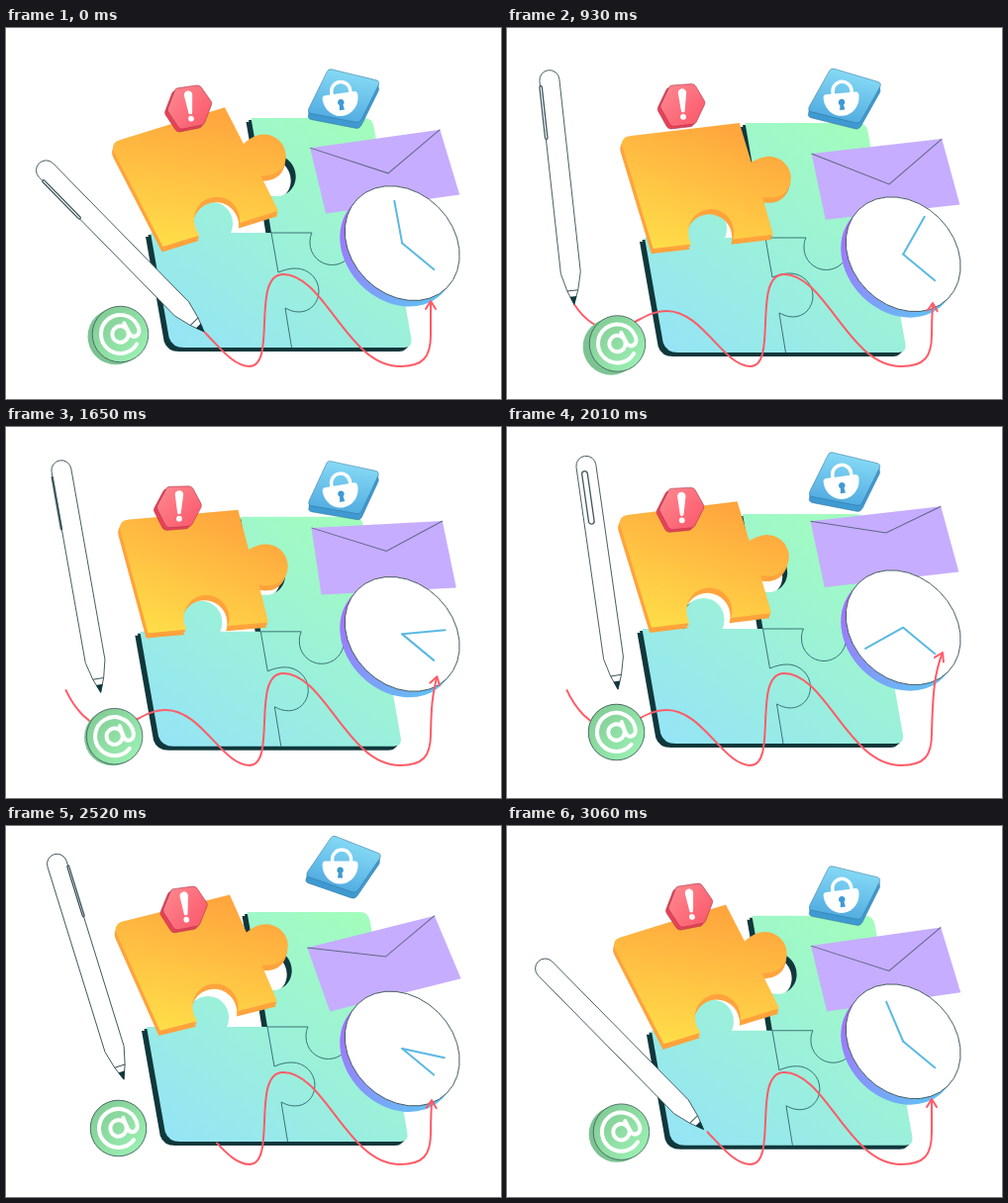
Recreate the animation shown at these times as an HTML page. Size 500x375 px, loop 3090 ms.

```html
<!DOCTYPE html>
<html lang="en">
<head>
<meta charset="utf-8">
<title>Puzzle desk</title>
<style>
  html, body { margin: 0; width: 100%; height: 100%; overflow: hidden; background: #fff; }
  svg { display: block; width: 100vw; height: 100vh; }
  .line { fill: none; stroke: #3d7377; stroke-width: 1; }
  .edge { stroke: #3f565c; stroke-width: .9; stroke-linejoin: round; }
  .red { fill: none; stroke: #ff5c68; stroke-width: 2; stroke-linejoin: round; stroke-linecap: round; }
  #trail { stroke-linecap: butt; }
  .hand { fill: none; stroke: #5bb9e3; stroke-width: 2; stroke-linecap: round; }
  #sign { fill: none; stroke: #fff; stroke-width: 4; stroke-linecap: round; stroke-linejoin: round; }
</style>
</head>
<body>
<svg viewBox="0 0 500 375">
  <defs>
    <linearGradient id="mint" x1="0" y1="1" x2=".8" y2="0">
      <stop offset="0" stop-color="#94e3f9"/><stop offset="1" stop-color="#a2fdbc"/>
    </linearGradient>
    <linearGradient id="amber" x1=".1" y1="1" x2=".75" y2=".1">
      <stop offset="0" stop-color="#ffdf49"/><stop offset="1" stop-color="#ffa63d"/>
    </linearGradient>
    <linearGradient id="rose" x1="0" y1="0" x2="1" y2="1">
      <stop offset="0" stop-color="#ff8b92"/><stop offset="1" stop-color="#fb5468"/>
    </linearGradient>
    <linearGradient id="sky" x1=".6" y1="0" x2=".4" y2="1">
      <stop offset="0" stop-color="#88dcf6"/><stop offset="1" stop-color="#50aae0"/>
    </linearGradient>
    <linearGradient id="rim">
      <stop offset="0" stop-color="#a66fff"/><stop offset="1" stop-color="#62c0f4"/>
    </linearGradient>
    <linearGradient id="leaf" x1="0" y1="0" x2="1" y2="1">
      <stop offset="0" stop-color="#7fc792"/><stop offset="1" stop-color="#9ff5b6"/>
    </linearGradient>

    <path id="base" d="M-20.5-116H94Q102-116 103.6-107L141.4 107Q143 116 134 116H-88Q-100 116-103.3 106L-122 0H-79
      c-1.5-3-2-6-2-10a21 21 0 0 1 42 0c0 4-.5 7-2 10H0L-6.3-39
      c4 1 7 2 12 2c10 0 19-8 19-20c0-12-10-22-22-22c-5 0-9 1-16 4Z"/>
    <path id="piece" d="M-131-116H-20.5L-13.3-75c7-3 11-4 16-4c12 0 22 10 22 22c0 12-9 20-19 20c-5 0-8-1-12-2L0 0H-41
      c1.5-3 2-6 2-10a23 23 0 0 0-46 0c0 4 .5 7 2 10H-122L-140.5-105Q-142.5-116-131-116Z"/>
    <path id="hex" d="M-10-20L10-20.5Q13-20 14-18L22-3Q23-1 22 1L13 18Q12 20 10 20L-10 21.5Q-13 21-14 19L-22 3Q-23 1-22-1L-13-18Q-12-20-10-20Z"/>
    <path id="tile" d="M-12-28L33-18Q37-17 35.500-13L19 22Q17 26 13 25L-32 17Q-36 16-34.500 12L-17-25Q-15.500-29-12-28Z"/>
    <ellipse id="disc" rx="63.7" ry="51.6" transform="rotate(45)"/>
  </defs>

  <g id="board">
    <g fill="#10383c">
      <use href="#base" transform="translate(-5 4)"/>
      <use href="#base" transform="translate(-2.5 2)"/>
    </g>
    <use href="#base" fill="url(#mint)"/>
    <path class="line" d="M0 0H41c-1.5 3-2 6-2 10a22.500 22.500 0 0 0 45 0c0-4-.5-7-2-10H122
      M0 0L7 40c7-3 12-4 18-4c12 0 23 10 23 23c0 12-9 21-20 21c-6 0-10-2-14-4L20.5 116"/>
  </g>

  <g id="orange">
    <g fill="#ffa33c" transform="translate(71 58)">
      <use href="#piece" transform="translate(-2.5 5)"/>
      <use href="#piece" transform="translate(-1.2 2.5)"/>
      <use href="#piece" fill="url(#amber)"/>
    </g>
  </g>

  <g id="alert">
    <g stroke="#a33a4a" stroke-width=".6">
      <use href="#hex" x="-3" y="2.5" fill="#ec4058"/>
      <use href="#hex" fill="url(#rose)"/>
    </g>
    <path fill="#fff" d="M-4.2-12a4.2 4.2 0 0 1 8.4 0L1.9 6a1.9 1.9 0 0 1-3.8 0z"/>
    <circle fill="#fff" cy="12.3" r="2.9"/>
  </g>

  <g id="lock">
    <g stroke="#2d6f93" stroke-width=".5">
      <use href="#tile" y="6" fill="#3f9ad2"/>
      <use href="#tile" y="3" fill="#3f9ad2" stroke="none"/>
      <use href="#tile" fill="url(#sky)"/>
    </g>
    <g transform="translate(-2 6) rotate(-9)">
      <path d="M-8-8V-12a9.500 9.500 0 0 1 19 0V-8" fill="none" stroke="#fff" stroke-width="3.500"/>
      <path fill="#fff" d="M-15-10H15Q18-10 18-6A18 19 0 0 1-18-6Q-18-10-15-10Z"/>
      <path fill="#3f9ad2" d="M0-4a3.200 3.200 0 0 1 1.800 5.900l.8 5.100h-5.200l.8-5.100a3.200 3.200 0 0 1 1.800-5.900z"/>
    </g>
  </g>

  <g id="mail">
    <path fill="#c6adff" d="M-70.500-34H62L72.500 34H-64Z"/>
    <path id="flap" class="line" style="stroke:#5f6689"/>
  </g>

  <g id="clock">
    <g fill="url(#rim)">
      <use href="#disc" x="-5" y="6"/>
      <use href="#disc" x="-2.500" y="3"/>
    </g>
    <use href="#disc" class="edge" fill="#fff"/>
    <path class="hand" d="M0 0L32 26.500"/>
    <path class="hand" id="minute" d="M0 0V-43.600"/>
  </g>

  <path id="trail" class="red"/>
  <path id="arrow" class="red" d="M-5 8L0 0L5 8"/>

  <g id="coin">
    <circle id="coinSide" r="28.500" fill="#7cc392"/>
    <circle class="edge" style="stroke-width:.8" r="28.300" fill="url(#leaf)"/>
    <g id="sign">
      <circle r="8.200"/>
      <path d="M8.500-8V3q0 6 5 6c4.500 0 6-5 6-9A19.500 19.500 0 1 0 10 16.700"/>
    </g>
  </g>

  <g id="pen">
    <path class="edge" fill="#fff" d="M-10-228a10 10 0 0 1 20 0V-32L5.500-14L0 0L-5.500-14L-10-32Z"/>
    <path class="line" style="stroke:#3f565c" d="M-5.500-14H5.500"/>
    <path fill="#10383c" d="M-3.500-8H3.500L0 1Z"/>
    <rect id="slot" class="edge" style="stroke-width:1.300" fill="#fff" y="-223" height="54"/>
  </g>
</svg>

<script>
const LOOP = 3090;
const BEAT = [0, 420, 930, 1290, 2010, 2520];
const $ = id => document.getElementById(id);

// Smooth periodic curve through the given values.
function curve(t, vals, times = BEAT) {
  const n = times.length;
  const wrap = i => (i + n) % n;
  const time = i => times[wrap(i)] + LOOP * Math.floor(i / n);
  const slope = i => (vals[wrap(i + 1)] - vals[wrap(i - 1)]) / (time(i + 1) - time(i - 1));
  let i = n - 1;
  while (times[i] > t) i--;
  const h = time(i + 1) - time(i), u = (t - time(i)) / h;
  const a = vals[i], b = vals[wrap(i + 1)];
  const v = 1 - u;
  return v * v * ((1 + 2 * u) * a + u * h * slope(i))
       + u * u * ((3 - 2 * u) * b - v * h * slope(i + 1));
}

function pose(id, x, y, r = 0) {
  $(id).setAttribute('transform', `translate(${x} ${y}) rotate(${r})`);
}

// Slow first part, then a fast steady spin from 1590 ms on.
const spin = (t, a, b, c) => t < 1590 ? a + (b - a) * t / 1590 : b + (c - b) * (t - 1590) / 1500;

const trail = $('trail');

function lengthAtX(x) {
  let lo = 0, hi = 240;
  for (let i = 0; i < 14; i++) {
    const mid = (lo + hi) / 2;
    if (trail.getPointAtLength(mid).x < x) lo = mid; else hi = mid;
  }
  return lo;
}

function drawTrail(t) {
  const ex = curve(t, [429, 429, 430, 429, 440, 430]);
  const ey = curve(t, [276, 282, 278, 284, 228, 277]);
  const lean = ex - 429;
  trail.setAttribute('d', `M60 265C68 283 84 304 105 304C128 304 138 286 161 286C198 286 218 342 246 342
    C274 342 247 249 280 249C322 249 345 342 398 342C422 342 429 332 429 310
    C${429 + lean * .1} ${310 + (ey - 310) * .5} ${429 + lean * .25} ${ey + 20} ${ex} ${ey}`);
  pose('arrow', ex, ey, lean * 2.4);
  const x = Math.max(60.2, curve(t, [200, 169, 68, 60, 60, 60, 212, 214, 208],
    [0, 420, 930, 1050, 1290, 2010, 2520, 2700, 2910]));
  const from = lengthAtX(x);
  trail.setAttribute('stroke-dasharray', `0 ${from} 2000`);
  return trail.getPointAtLength(from);
}

function drawPen(t, start) {
  const times = [0, 420, 930, 1050, 1200, 1290, 2010, 2520, 2700, 2850];
  const along = v => curve(t, v, times);
  let x = along([200, 169, 68, 60, 69, 76, 112, 119, 134, 158]);
  let y = along([307.5, 287, 279, 265, 268, 270, 265, 256, 265, 281]);
  if (t < 1050) ({ x, y } = start);
  pose('pen', x, y, along([-44.4, -23.3, -6.3, -8.2, -13.4, -13.7, -8.1, -17.2, -25, -34.5]));

  const a = spin(t, -115, -115, 245) * Math.PI / 180;
  const half = Math.max(.3, 2.9 * Math.abs(Math.cos(a)));
  const slot = $('slot');
  slot.setAttribute('x', 10.5 * Math.sin(a) - half);
  slot.setAttribute('width', 2 * half);
  slot.setAttribute('rx', half);
  slot.style.display = Math.cos(a) > -.45 ? '' : 'none';
}

function draw(t) {
  const c = (...v) => curve(t, v);
  pose('board', c(268, 266, 261, 257.5, 258.5, 264), c(207, 211, 212, 210, 204, 203));
  pose('orange', c(190, 192, 191.5, 189.5, 189.5, 191), c(150.5, 159.5, 159.5, 154, 139, 138),
    c(-17.3, -15.6, -6.8, -4.5, -7, -14));
  pose('alert', c(185.5, 183, 177.5, 174.5, 176.5, 181), c(79.5, 77.5, 77.5, 78.5, 82, 82.5),
    c(-7, -6, -2.5, 0, -1, -6));

  const lift = [0, 420, 570, 930, 1290, 2010, 2520, 2700];
  pose('lock', 340.5, curve(t, [70, 63, 62, 70, 69.5, 54, 40, 41.5], lift),
    curve(t, [1, 8, 9, 4, 0, 1, 9, 9], lift));

  pose('mail', c(381.7, 381.7, 381.5, 381, 380.5, 381), c(145, 144.5, 152.8, 147.5, 121, 138.8),
    c(-8, -11.7, -6.5, -1.3, -6.5, -14.1));
  $('flap').setAttribute('d', `M-70.5-34L4 ${c(2.4, 1.2, 5.6, 2.6, -13.6, -6)}L62-34`);

  pose('clock', 400.2, c(217.6, 222, 228.7, 221, 202.7, 225));
  pose('minute', 0, 0, spin(t, -10.5, 58, 709.5));

  pose('coin', c(115.5, 114.5, 111.5, 109.5, 110.5, 113.5), c(309.5, 315.5, 319, 317, 308.5, 305.5));
  const depth = Math.max(0, c(4.5, 7, 6.3, 4.5, 0, 0));
  pose('coinSide', -depth, depth * .5);
  pose('sign', 0, 0, c(-28, -30, -28, -22, -20, -22));

  drawPen(t, drawTrail(t));
}

const begin = performance.now();
function tick() {
  draw((performance.now() - begin) % LOOP);
  requestAnimationFrame(tick);
}
tick();
</script>
</body>
</html>
```
